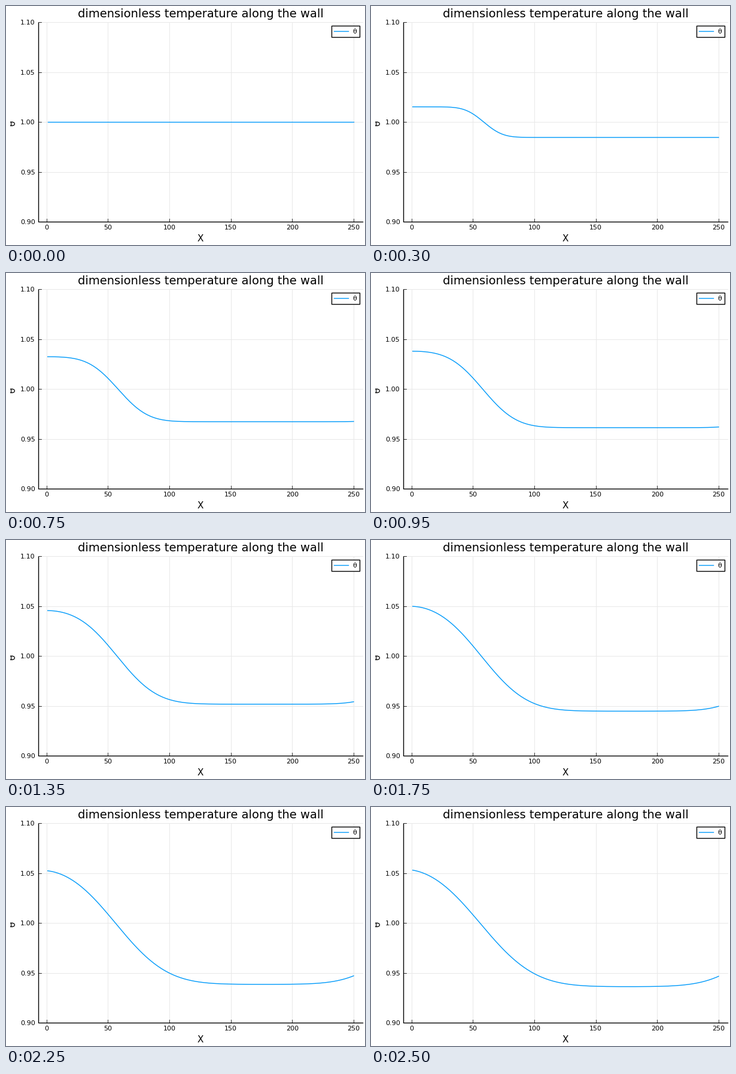
Animation, 600 px wide and 400 px high, one loop 2550 ms. Source, as a matplotlib script:

```python
import math

import matplotlib.pyplot as plt
import numpy as np
from matplotlib.animation import FuncAnimation
from matplotlib.patches import Rectangle

W, H, DPI = 600, 400, 100
FRAMES, STEP = 51, 50
PX = 72 / DPI  # one pixel in points
BLUE = "#009afa"
LEFT, RIGHT, TOP, BOTTOM = 54.4, 596.3, 27.5, 361.2

plt.rcParams["font.family"] = "DejaVu Sans"
fig = plt.figure(figsize=(W / DPI, H / DPI), dpi=DPI, facecolor="white")
ax = fig.add_axes([0, 0, 1, 1])
ax.set_xlim(0, W)
ax.set_ylim(H, 0)
ax.axis("off")

erf = np.vectorize(math.erf)
cells = np.arange(1, 251)


def px(x):
    return LEFT + (x + 6.47) / 263.94 * (RIGHT - LEFT)


def py(v):
    return BOTTOM - (v - 0.9) / 0.2 * (BOTTOM - TOP)


def line(xs, ys, color="black", width=1.0, **kw):
    return ax.plot(xs, ys, color=color, lw=width * PX, **kw)[0]


def label(x, y, text, size, ha="center", **kw):
    ax.text(x, y, text, fontsize=size, ha=ha, va="baseline", **kw)


def theta(t):
    """Smeared hot and cold zones, warming and cooling towards equilibrium."""
    if t == 0:
        return np.ones(len(cells))
    spread = math.sqrt(2 * 24.3 * t)
    drift = 0.07 * t
    front = erf((cells - 59.3 + drift) / spread)
    left = 1 + erf((-54.5 - 1e-4 * t**3 - cells) / spread)
    right = 1 + erf((cells - 302 + drift) / spread)
    gain = 0.0748 * (1 - math.exp(-0.0383 * t))
    return 1 + gain * (right - left - front)


# grid, ticks and tick labels
for x in range(0, 251, 50):
    line([px(x)] * 2, [TOP, BOTTOM], "#e8e8e8")
    line([px(x)] * 2, [BOTTOM, BOTTOM - 5], width=0.8)
    label(px(x), 374.5, str(x), 8)
for v in (0.9, 0.95, 1.0, 1.05, 1.1):
    line([LEFT, RIGHT], [py(v)] * 2, "#e8e8e8")
    line([LEFT, LEFT + 5], [py(v)] * 2, width=0.8)
    label(48.7, py(v) + 4, f"{v:.2f}", 8, ha="right")
line([LEFT, LEFT, RIGHT], [TOP, BOTTOM, BOTTOM], width=1.4,
     solid_joinstyle="miter")

# titles; the vertical label is cut off at its top
label(325.3, 19.3, "dimensionless temperature along the wall", 14)
label(325, 393.5, "X", 11)
label(15.6, 196, "θ", 11, rotation=90, rotation_mode="anchor")
ax.add_patch(Rectangle((0, 180), 7, 32, fc="white", ec="none", zorder=4))

curve = line(px(cells), py(theta(0)), BLUE, 1.4)

# legend
ax.add_patch(Rectangle((544.4, 33.4), 47, 18.6, fc="white", ec="black",
                       lw=1.4 * PX, zorder=5))
line([548, 571.5], [42.2, 42.2], BLUE, 1.4, zorder=6)
label(579, 45.6, "θ", 8, ha="left", zorder=6)


def update(t):
    curve.set_ydata(py(theta(t)))
    return [curve]


anim = FuncAnimation(fig, update, frames=FRAMES, interval=STEP,
                     repeat=True, repeat_delay=0)
plt.show()
```
